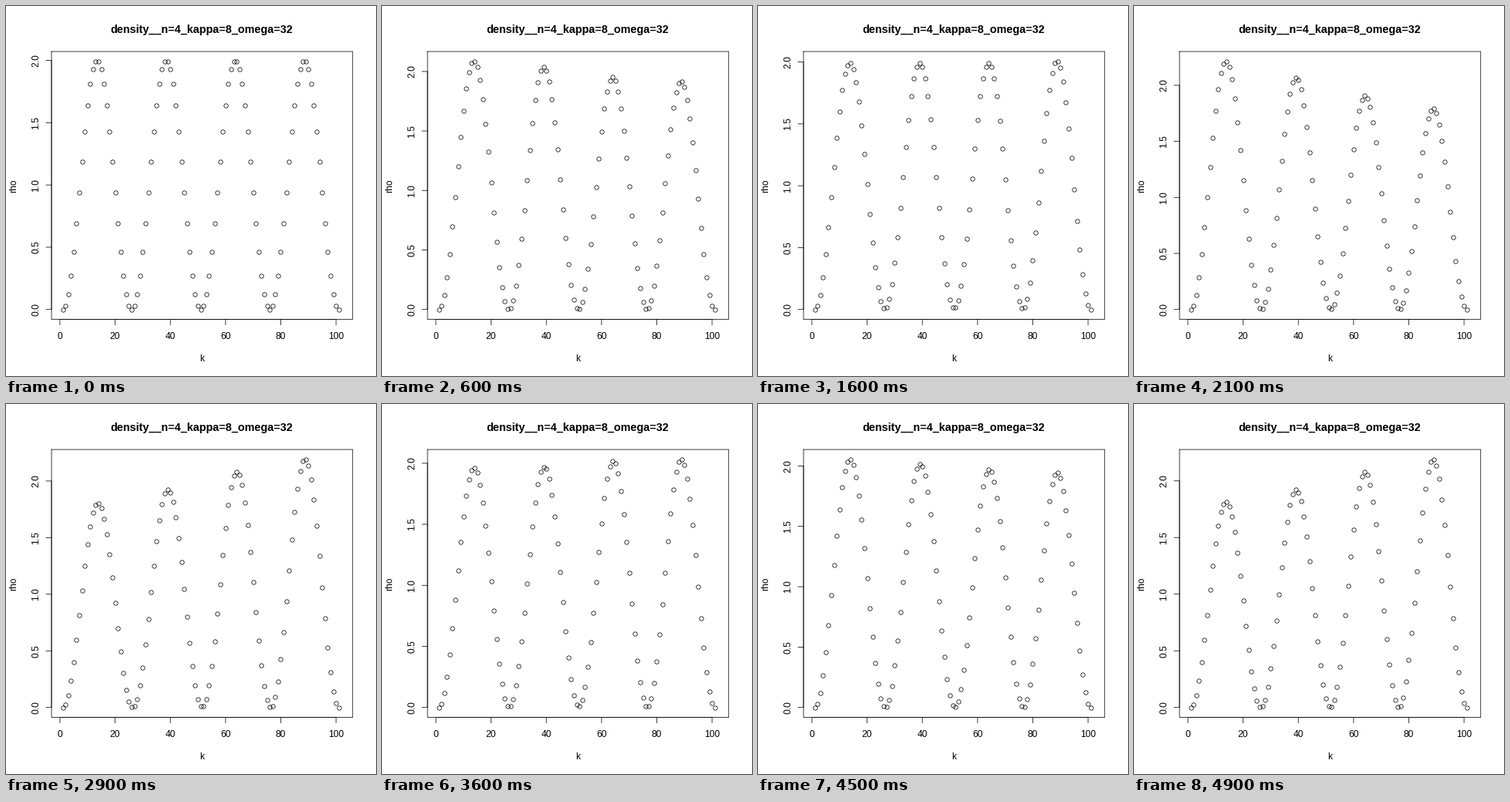
A matplotlib script for the animation above (5 s loop, 480 px wide and 480 px high).

```python
import numpy as np
import matplotlib.pyplot as plt
from matplotlib.animation import FuncAnimation

SIZE = 480
FRAMES, INTERVAL = 50, 100
LEFT, RIGHT, TOP, BOTTOM = 59.04, 449.76, 59.04, 406.56
LINE = 14.4  # height of one margin line
STROKE = 0.75
K_MIN, K_MAX, PAD = 1, 102, 0.04

# Quantum particle in a unit box, started in level 4 and pushed by a linear potential
CELLS, LEVEL, FORCE, TIME_STEP = 100, 4, -6.93, 0.1
grid = np.arange(CELLS + 1) / CELLS
k = np.arange(1, CELLS + 2)
inner = grid[1:-1]
hop = np.full(CELLS - 2, -CELLS**2 / 2)
hamiltonian = (np.diag(CELLS**2 + FORCE * (inner - 0.5))
               + np.diag(hop, 1) + np.diag(hop, -1))
energies, modes = np.linalg.eigh(hamiltonian)
weights = modes.T @ (np.sqrt(2) * np.sin(LEVEL * np.pi * inner))


def density(time):
    psi = modes @ (weights * np.exp(-1j * energies * time))
    return np.pad(np.abs(psi) ** 2, 1)


def padded(fraction):
    return (fraction + PAD) / (1 + 2 * PAD)


def to_x(value):
    return LEFT + padded((value - K_MIN) / (K_MAX - K_MIN)) * (RIGHT - LEFT)


def to_y(value, top):
    return BOTTOM - padded(value / top) * (BOTTOM - TOP)


plt.rcParams["font.family"] = "Liberation Sans"
fig = plt.figure(figsize=(SIZE / 72, SIZE / 72), dpi=72, facecolor="white")
ax = fig.add_axes([0, 0, 1, 1])
ax.set(xlim=(0, SIZE), ylim=(SIZE, 0))
ax.axis("off")


def stroke(xs, ys):
    return ax.plot(xs, ys, color="black", lw=STROKE, snap=False,
                   solid_capstyle="round", solid_joinstyle="round")[0]


def label(x, y, text, size=12, **style):
    return ax.text(x, y, text, size=size, ha="center", va="baseline",
                   rotation_mode="anchor", **style)


stroke([LEFT, RIGHT, RIGHT, LEFT, LEFT], [TOP, TOP, BOTTOM, BOTTOM, TOP])
mid_x, mid_y = (LEFT + RIGHT) / 2, (TOP + BOTTOM) / 2
label(mid_x - 0.5, 34.8, "density__n=4_kappa=8_omega=32", LINE, weight="bold")
label(mid_x, BOTTOM + 3.8 * LINE, "k")
label(LEFT - 3.2 * LINE + 0.5, mid_y, "rho", rotation=90)

stroke([to_x(0), to_x(100)], [BOTTOM, BOTTOM])
for value in range(0, 101, 20):
    x = to_x(value)
    stroke([x, x], [BOTTOM, BOTTOM + LINE / 2])
    label(x, BOTTOM + 1.8 * LINE, str(value))

y_values = np.arange(5) * 0.5
y_axis = stroke([LEFT, LEFT], [0, 0])
y_ticks = [stroke([LEFT - LINE / 2, LEFT], [0, 0]) for _ in y_values]
y_labels = [label(LEFT - 1.2 * LINE + 0.5, 0, f"{v:.1f}", rotation=90)
            for v in y_values]

points, = ax.plot(to_x(k), np.zeros(k.size), "o", ms=5.4, mfc="none",
                  mec="black", mew=STROKE, snap=False)


def update(frame):
    rho = density(frame * TIME_STEP)
    top = rho.max()
    points.set_ydata(to_y(rho, top))
    y_axis.set_ydata(to_y(y_values[[0, -1]], top))
    for value, tick, text in zip(y_values, y_ticks, y_labels):
        y = to_y(value, top)
        tick.set_ydata([y, y])
        text.set_y(y)
    return [points, y_axis, *y_ticks, *y_labels]


anim = FuncAnimation(fig, update, frames=FRAMES, interval=INTERVAL,
                     repeat=True, repeat_delay=0, blit=False)
plt.show()
```
